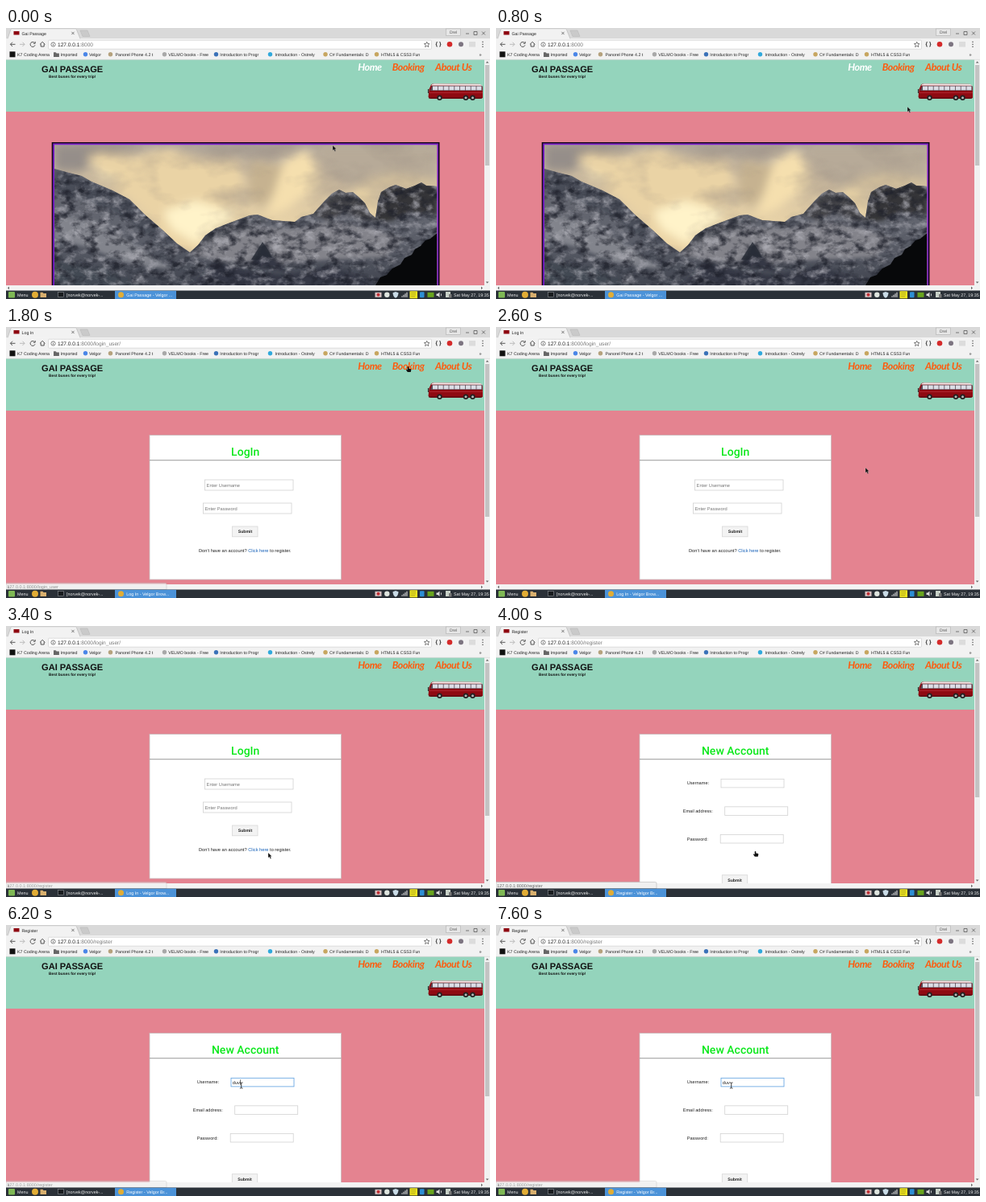
These frames come from a looping animation (600x337 px, 8 s). An HTML page:

```html
<!DOCTYPE html>
<html lang="en">
<head>
<meta charset="utf-8">
<title>Bus booking walkthrough</title>
<style>
html, body { margin: 0; width: 100%; height: 100%; overflow: hidden; background: #fff; }
svg { display: block; width: 100vw; height: 100vh; }
text { font-family: "Liberation Sans", Arial, sans-serif; font-size: 5.6px; fill: #222; text-rendering: geometricPrecision; white-space: pre; }
.b { font-weight: bold; }
.mid { text-anchor: middle; }
.small { font-size: 5.3px; }
.nav text { font: italic 700 12.4px Lato, sans-serif; letter-spacing: -.4px; text-anchor: middle; fill: #ff5a0c; }
.title { font: 500 14px Roboto, sans-serif; fill: #0ce81c; text-anchor: middle; }
.hint { fill: #777; font-size: 5.7px; }
.field { fill: #fff; stroke: #d2d2d2; stroke-width: .8; }
.button { fill: #f3f3f3; stroke: #d8d8d8; stroke-width: .8; }
.line { fill: none; stroke: #555; stroke-width: 1; }
.thin { stroke-width: .75; }
.bar text { fill: #eee; font-size: 5.4px; }
</style>
</head>
<body>
<svg viewBox="0 0 600 337" preserveAspectRatio="none">
<defs>
  <clipPath id="frame"><rect x="60" y="145" width="474.5" height="180"/></clipPath>
  <clipPath id="inRange"><use href="#range"/></clipPath>
  <linearGradient id="sky" x2="0" y2="1">
    <stop stop-color="#b3a99c"/><stop offset=".25" stop-color="#d2c0a2"/><stop offset=".6" stop-color="#ecd6a8"/>
  </linearGradient>
  <linearGradient id="rock" x2="0" y2="1">
    <stop stop-color="#696b73"/><stop offset=".5" stop-color="#60636d"/><stop offset="1" stop-color="#3f434e"/>
  </linearGradient>
  <filter id="soft" x="-50%" y="-50%" width="200%" height="200%"><feGaussianBlur stdDeviation="6"/></filter>
  <filter id="blend" x="-20%" y="-20%" width="140%" height="140%"><feGaussianBlur stdDeviation="2"/></filter>
  <filter id="cloud" color-interpolation-filters="sRGB" x="0" y="0" width="1" height="1">
    <feTurbulence type="fractalNoise" baseFrequency=".016 .028" numOctaves="4" seed="5"/>
    <feColorMatrix values="0 0 0 0 .62  0 0 0 0 .57  0 0 0 0 .52  2.4 0 0 0 -1.05"/>
  </filter>
  <filter id="crag" color-interpolation-filters="sRGB" x="0" y="0" width="1" height="1">
    <feTurbulence type="fractalNoise" baseFrequency=".07 .1" numOctaves="5" seed="8" result="noise"/>
    <feColorMatrix values="0 0 0 0 .12  0 0 0 0 .13  0 0 0 0 .17  3 0 0 0 -1.35" result="dark"/>
    <feColorMatrix in="noise" values="0 0 0 0 .7  0 0 0 0 .7  0 0 0 0 .73  0 2.6 0 0 -1.2" result="light"/>
    <feMerge result="both"><feMergeNode in="light"/><feMergeNode in="dark"/></feMerge>
    <feComposite in="both" in2="SourceGraphic" operator="in"/>
  </filter>
  <path id="range" d="M60 175L78 180 94 184 106 191 118 196 132 202 153 213 172 232 195 252 212 268 228 279 238 270 247 258 260 249 278 242 302 233 312 232 330 239 358 241 366 235 381 231 395 215 404 206 413 201 421 205 430 204 437 210 445 218 451 230 458 236 461 216 465 204 475 198 483 195 496 200 507 196 515 192 521 196 534.500 197V325H60Z"/>
</defs>

<!-- page -->
<rect y="39" width="593" height="65" fill="#94d4bc"/>
<rect y="104" width="593" height="217" fill="#e48390"/>
<text class="b" x="44" y="55.4" style="font-size:11.1px;fill:#111">GAI PASSAGE</text>
<text class="b" x="53" y="61.6" style="font-size:4.85px;fill:#111">Best buses for every trip!</text>
<g class="nav">
  <text id="home" x="451" y="52.8">Home</text><text x="498.7" y="52.8">Booking</text><text x="554.7" y="52.8">About Us</text>
</g>
<g id="bus">
  <path d="M523.5 86L524.5 76 527 70.5Q528 69.3 531 69.3L586 69.8Q590 70 591 74V87L588 88H526Z" fill="#8f0a12"/>
  <path d="M527 71.5Q528 69.3 531 69.3L586 69.8Q589.5 70 590.3 71.8Z" fill="#f1eaea"/>
  <path d="M526 78L528 72H590.5V78Z" fill="#5c4a55"/>
  <path d="M525 80.5H591" stroke="#b92a34" stroke-width=".8"/>
  <path d="M524 87H590" stroke="#4b0c13" stroke-width="1.2"/>
  <path d="M523.5 76V81" stroke="#333" stroke-width="1.2"/>
</g>

<g id="photo" clip-path="url(#frame)">
  <rect x="60" y="145" width="474.5" height="180" fill="url(#sky)"/>
  <g filter="url(#soft)">
    <path d="M60 145H175L150 152 112 158 95 178H60Z" fill="#958e89"/>
    <path d="M100 160L118 155 160 160 200 150 240 163 290 165 295 200 260 245 228 280 180 235 130 195Z" fill="#ead3a5"/>
    <path d="M105 158L118 180 145 190 120 190Z" fill="#fff0c2"/>
    <path d="M195 228L235 215 285 230 270 246 235 268 205 250Z" fill="#fff3c9"/>
    <path d="M225 145H345L330 160 290 158 250 154Z" fill="#aaa095"/>
    <path d="M303 165L345 172 338 200 318 222 300 212Z" fill="#c6b290"/>
    <path d="M345 165L372 152 385 170 390 195 365 212 350 225 322 235 330 212Z" fill="#f5dfae"/>
    <path d="M385 145H534V190L510 185 470 188 430 198 410 188 395 175Z" fill="#b7aa98"/>
    <path d="M440 190L480 180 534 188V200H455Z" fill="#d2bf9c"/>
    <path d="M430 198L448 200 458 230 445 220Z" fill="#f3dca9"/>
  </g>
  <rect x="60" y="145" width="474.5" height="140" filter="url(#cloud)" opacity=".45"/>
  <use href="#range" fill="url(#rock)"/>
  <g clip-path="url(#inRange)">
    <g filter="url(#blend)">
      <path d="M60 175L106 191 153 213 195 252 215 272 185 262 130 225 60 205Z" fill="#484d59"/>
      <path d="M60 232L110 240 165 272 205 300 150 292 100 272 60 262Z" fill="#82848c"/>
      <path d="M225 282L260 262 310 247 360 250 400 240 450 248 495 262 470 285 400 288 350 292 270 290Z" fill="#83838a"/>
      <path d="M378 231L413 200 445 214 462 240 440 238 420 228 400 240Z" fill="#45444a"/>
      <path d="M458 240L464 203 483 194 534 192V232L500 228 478 240Z" fill="#363437"/>
      <path d="M232 275L247 258 285 241 330 239 300 248 268 258Z" fill="#41434c"/>
      <path d="M300 296L318 266 334 286 356 308 335 300ZM225 325L262 290 300 302 345 308 400 296 450 312 450 325Z" fill="#343944"/>
      <path d="M60 290L120 300 180 325H60Z" fill="#434853"/>
    </g>
  </g>
  <use href="#range" filter="url(#crag)" opacity=".8"/>
  <path d="M304 288L318 266 325 276 330 286 318 283 311 289Z" fill="#252a34" opacity=".8"/>
  <path d="M534.500 255L526 262 520 264 514 271 507 275 503 282 494 286 489 294 479 299 472 307 464 310 455 325H534.500Z" fill="#07080a"/>
</g>
<path id="border" d="M59 325V144.200H535.500V325" fill="none" stroke="#7a1bd0" stroke-width="2"/>
<path id="edge" d="M57.500 325V142.800H536.700V325" fill="none" stroke="#12071a" stroke-width="1.600"/>

<g id="login">
  <rect x="178" y="134.5" width="237.5" height="179.5" fill="#fff" stroke="#c9b9bb" stroke-width=".8"/>
  <path d="M178 165.7H415.5" stroke="#9a9a9a"/>
  <text class="title" x="296.7" y="159.5">LogIn</text>
  <rect class="field" x="246.5" y="190" width="109.5" height="13"/><text class="hint" x="248.6" y="198.8">Enter Username</text>
  <rect class="field" x="244.5" y="219" width="109.5" height="13"/><text class="hint" x="246.5" y="227.8">Enter Password</text>
  <rect class="button" x="280.5" y="248" width="31.5" height="12.8"/><text class="b mid" x="296.5" y="256.3" style="font-size:5.2px">Submit</text>
  <text x="239" y="280" style="font-size:5.7px">Don't have an account? <tspan fill="#1560b8">Click here</tspan> to register.</text>
</g>

<g id="register">
  <rect x="178" y="134.5" width="237.5" height="200" fill="#fff" stroke="#c9b9bb" stroke-width=".8"/>
  <path d="M178 165.7H415.5" stroke="#9a9a9a"/>
  <text class="title" x="296.7" y="159.5">New Account</text>
  <text x="236.7" y="197.4">Username:</text><rect id="user" class="field" x="279" y="190.3" width="78" height="10.6"/>
  <text x="231.7" y="232">Email address:</text><rect class="field" x="283.7" y="224.8" width="78" height="10.6"/>
  <text x="236.7" y="266.7">Password:</text><rect class="field" x="278.2" y="259.4" width="78" height="10.6"/>
  <rect class="button" x="280.3" y="309.7" width="31.4" height="13"/><text class="b mid" x="296" y="318" style="font-size:5.2px">Submit</text>
  <text id="typed" x="280.8" y="197.5"></text>
  <path id="caret" stroke="#222" stroke-width=".7"/>
</g>

<!-- scrollbars -->
<rect x="593" y="39" width="7" height="288" fill="#f1f1f1"/>
<rect id="thumb" x="594" y="46" width="5.2" fill="#c3c3c3"/>
<path d="M594.7 43.6L596.6 41.5 598.5 43.6ZM594.7 315.4L596.6 317.5 598.5 315.4Z" fill="#666"/>
<rect y="320" width="593" height="6.6" fill="#f3f3f3"/>
<path d="M4 321.4L2 323.3 4 325.2ZM589 321.4L591 323.3 589 325.2Z" fill="#666"/>
<g id="status">
  <path d="M0 318.4H197.5Q199 318.4 199 320V326.5H0Z" fill="#f0f0f0" stroke="#bdbdbd" stroke-width=".7"/>
  <text id="link" x="1.2" y="324.6" style="font-size:5.5px;fill:#666"></text>
</g>

<!-- browser -->
<rect width="600" height="13.5" fill="#d9d9d9"/>
<path d="M92 3H101L104 10.5H95Z" fill="#cacaca" stroke="#b5b5b5" stroke-width=".5"/>
<rect y="13" width="600" height="26.4" fill="#f2f2f2"/>
<path d="M2 13.3L6 1.6Q6.5 .8 7.5 .8H85.5Q86.8 .8 87.3 1.6L92 13.3" fill="#f2f2f2" stroke="#b3b3b3" stroke-width=".6"/>
<rect x="9.5" y="4" width="7" height="4.5" fill="#8f0a12"/>
<text id="tab" class="small" x="19.5" y="8.5"></text>
<path class="line thin" d="M81.3 4.8L84.6 8.1M84.6 4.8L81.3 8.1"/>
<rect x="545.5" y="1" width="18" height="8.5" fill="#e6e6e6" stroke="#aaa" stroke-width=".5"/>
<text class="mid" x="554.5" y="7" style="font-size:5px;fill:#555">Drel</text>
<path class="line thin" d="M570 7H574M580 4.5H584V8.5H580ZM590 4.5L594 8.5M594 4.5L590 8.5"/>
<path class="line" d="M11.5 20.3H5.5M8 17.7L5.4 20.3 8 22.9"/>
<path class="line" d="M17 20.3H23M20.5 17.7L23.1 20.3 20.5 22.9" style="stroke:#bbb"/>
<path class="line" d="M35.6 18.7A3 3 0 1 0 36 21.3M36.2 16.9V19.2H33.8"/>
<path class="line" d="M42 20.4L45.2 17.3 48.4 20.4M43.2 19.8V23H47.2V19.8"/>
<rect x="52.5" y="15.2" width="475" height="11" rx="1" fill="#fff" stroke="#c8c8c8" stroke-width=".6"/>
<circle class="line thin" cx="58.5" cy="20.5" r="2.6"/><path class="line thin" d="M58.5 19.8V22M58.5 18.7V19.2"/>
<text x="64" y="22.8" style="font-size:6.6px">127.0.0.1<tspan id="path" fill="#777"></tspan></text>
<path class="line thin" d="M521.7 17.2L522.6 19.4 525 19.6 523.2 21.2 523.8 23.6 521.7 22.3 519.6 23.6 520.2 21.2 518.4 19.6 520.8 19.4Z"/>
<text class="b mid" x="536" y="22.4" style="font-size:6.6px">{ }</text>
<circle cx="550" cy="20.3" r="3.3" fill="#d42a2a"/>
<circle cx="564" cy="20.3" r="3" fill="#7c7480"/>
<rect x="574" y="17" width="8" height="6.5" fill="#dcdcdc"/>
<path d="M591 17.3v.1M591 20.3v.1M591 23.3v.1" stroke="#555" stroke-width="1.4" stroke-linecap="round"/>
<g id="bookmarks"></g>
<text class="mid" x="588" y="34.8">»</text>
<path d="M0 39.3H600" stroke="#c9c9c9" stroke-width=".5"/>

<!-- taskbar -->
<g class="bar">
  <rect y="326.5" width="600" height="10.5" fill="#2b3138"/>
  <rect x="3" y="328" width="8" height="7.5" rx="1" fill="#7fb955"/>
  <text x="14" y="333.7">Menu</text>
  <circle cx="36" cy="331.8" r="4" fill="#e2ad35"/>
  <path d="M42.5 328.8H45.5L46.5 330H50V335H42.5Z" fill="#d9b06f"/>
  <rect x="64.5" y="328.6" width="7" height="6" fill="#181b1e" stroke="#8a8f94" stroke-width=".6"/>
  <text x="75" y="333.7">[norvek@norvek-...</text>
  <rect x="135" y="326.8" width="76" height="10.2" fill="#4b92d8"/>
  <circle cx="142.5" cy="331.8" r="3.5" fill="#e2ad35"/>
  <text id="task" x="149.3" y="333.7" style="fill:#fff"></text>
  <rect x="457.5" y="328.8" width="8" height="6" fill="#d9c4c4"/><circle cx="461.5" cy="331.8" r="2" fill="#c12f35"/>
  <circle cx="472.3" cy="331.8" r="3.2" fill="#dfe5df"/>
  <path d="M483 328L486.5 329.2Q486.5 333.8 483 335.7 479.5 333.8 479.5 329.2Z" fill="#c9dbe6"/>
  <path d="M491 334.8V333.2M493 334.8V331.8M495 334.8V330.3M497 334.8V328.8" stroke="#ddd" stroke-width="1.1"/>
  <rect x="500.5" y="327.3" width="9.5" height="9" fill="#efe51e"/>
  <path d="M502 329.5H508M502 331.8H508M502 334H507" stroke="#8a851d" stroke-width=".6"/>
  <rect x="513" y="328.3" width="5.5" height="7" rx="1" fill="#2d8fd5"/>
  <rect x="522.5" y="328.8" width="8" height="6" fill="#69a51e"/>
  <path d="M533.5 330.5H535.2L537.5 328.5V335L535.2 333H533.5ZM539 329.8Q541 331.8 539 333.8" fill="#ddd"/>
  <rect x="545" y="328" width="6" height="7" fill="#c8d1c8"/><rect x="549" y="331" width="3.5" height="4.5" fill="#777"/>
  <text x="555" y="333.7">Sat May 27, 19:35</text>
</g>

<g id="pointer">
  <path id="arrow" d="M0 0V6.2L1.5 5 2.7 7.4 3.8 6.9 2.7 4.6H4.6Z" fill="#111" stroke="#ddd" stroke-width=".25"/>
  <path id="hand" d="M-.8 .4Q0-.6 .8 .4V2.5L3.3 3Q4 3.300 3.800 4.200L3.200 6.700H-.7L-2.500 4.200Q-2.400 3.300-1.700 3.600L-.8 4.300Z" fill="#111"/>
  <path id="beam" d="M-1.8-3.5H-.5L0-3 .5-3.5H1.8M0-3V3M-1.8 3.5H-.5L0 3 .5 3.5H1.8" fill="none" stroke="#111" stroke-width=".8"/>
</g>
</svg>

<script>
const $ = id => document.getElementById(id);
const show = (id, on) => { $(id).style.display = on ? "" : "none"; };

function add(parent, tag, attrs, text = "") {
  const el = document.createElementNS(parent.namespaceURI, tag);
  for (const key in attrs) el.setAttribute(key, attrs[key]);
  el.textContent = text;
  parent.append(el);
}

// icon x, text x, icon colour, label
[
  [8, 14, "#111", "K7 Coding Arena"],
  [63, 67.6, "#666", "Imported"],
  [98.5, 103, "#4a86e8", "Velgor"],
  [129.5, 135.5, "#b5a27d", "Panorel Phone 4.2 t"],
  [196.5, 201.3, "#a8a8a8", "VELMO books - Free"],
  [260.5, 265.3, "#3b72b8", "Introduction to Progr"],
  [327.5, 333.5, "#31a9dc", "Introduction - Ostrely"],
  [396, 401, "#c7a660", "C# Fundamentals: D"],
  [459.5, 465, "#c7a660", "HTML5 & CSS3 Fun"]
].forEach(([ix, tx, fill, label], i) => {
  const bar = $("bookmarks");
  if (i === 1) add(bar, "path", { d: "M59 30.3H61.7L62.7 31.5H65.9V36H59Z", fill });
  else if (i === 0) add(bar, "rect", { x: 4.5, y: 29.3, width: 7, height: 7, fill });
  else add(bar, "circle", { cx: ix, cy: 32.8, r: 2.7, fill });
  add(bar, "text", { x: tx, y: 34.9, class: "small" }, label);
});

for (let i = 0; i < 9; i++)
  add($("bus"), "rect", { x: 529 + i * 6.8, y: 72.5, width: 6, height: 4.8, fill: "#dcdde6" });
for (const cx of [537.5, 570, 578.5]) {
  add($("bus"), "circle", { cx, cy: 86.7, r: 3.2, fill: "#222" });
  add($("bus"), "circle", { cx, cy: 86.7, r: 1.5, fill: "#b9b9b9" });
}

// Each table holds [start ms, value...]; a value lasts until the next row.
const at = (table, t) => table.findLast(row => row[0] <= t).slice(1);

const pages = [
  [0, "home", "Gai Passage", ":8000", "Gai Passage - Velgor ...", 171],
  [1600, "home", "Log In", ":8000/login_user/", "Log In - Velgor Brow...", 171],
  [1800, "login", "Log In", ":8000/login_user/", "Log In - Velgor Brow...", 236],
  [4000, "register", "Register", ":8000/register", "Register - Velgor Br...", 213]
];
const pointers = [
  [0, "arrow", 405, 146], [400, "arrow", 414, 142], [600, "arrow", 455, 124],
  [800, "arrow", 510, 98], [1000, "arrow", 531, 72], [1200, "hand", 506, 51],
  [1400, "hand", 498.5, 49.2], [2000, "arrow", 496, 56], [2200, "arrow", 488, 86],
  [2400, "arrow", 474, 132], [2600, "arrow", 458, 175], [2800, "arrow", 437, 207],
  [3000, "arrow", 398, 246], [3200, "arrow", 352, 273], [3400, "arrow", 325, 282],
  [3600, "hand", 321.5, 280], [4200, "arrow", 319, 274], [4400, "arrow", 309, 247],
  [4600, "arrow", 298, 216], [4800, "beam", 291.7, 199.5]
];
const links = [
  [0, "", 0], [1200, "login_user", 1], [1800, "login_user", .7], [2000, "", 0],
  [3400, "register", .6], [3600, "register", 1], [4200, "register", .6]
];
const typing = [
  [0, "", 0], [5000, "", 1], [5600, "d", 1], [6000, "du", 1], [6200, "duv", 1],
  [6800, "duv", 0], [7400, "duv", 1], [7600, "duv", 0]
];

function draw(t) {
  const [page, tab, path, task, thumbEnd] = at(pages, t);
  for (const id of ["login", "register"]) show(id, page === id);
  for (const id of ["photo", "border", "edge"]) show(id, page === "home");
  $("home").style.fill = page === "home" ? "#fff" : "";
  $("tab").textContent = tab;
  $("path").textContent = path;
  $("task").textContent = task;
  $("thumb").setAttribute("height", thumbEnd - 46);

  const [kind, x, y] = at(pointers, t);
  for (const id of ["arrow", "hand", "beam"]) show(id, id === kind);
  $("pointer").setAttribute("transform", `translate(${x} ${y})`);

  const [link, opacity] = at(links, t);
  $("link").textContent = "127.0.0.1:8000/" + link;
  $("status").style.opacity = opacity;

  const [typed, caret] = at(typing, t);
  $("typed").textContent = typed;
  $("caret").setAttribute("d", `M${281.3 + typed.length * 3.1} 192.3V198.8`);
  show("caret", caret);
  $("user").style.stroke = t >= 5000 ? "#5b9fe0" : "";
}

const start = performance.now();
let shown = -1;
function tick() {
  const step = Math.floor((performance.now() - start) % 8000 / 200);
  if (step !== shown) draw((shown = step) * 200);
  requestAnimationFrame(tick);
}
tick();
</script>
</body>
</html>
```
